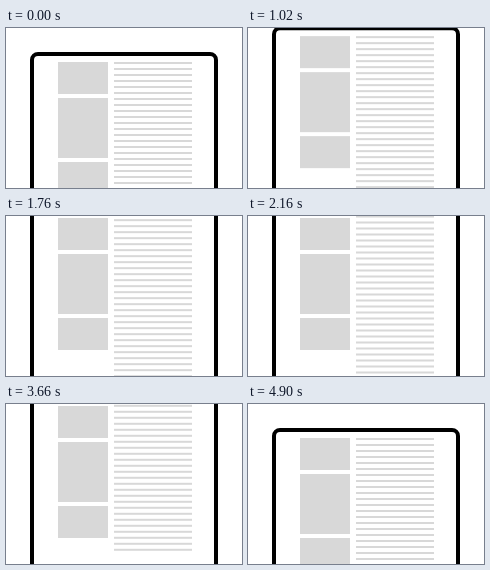
Animation of 236x160 px, one loop 4.92 s. Source, as an HTML page with a canvas:

```html
<!DOCTYPE html>
<html lang="en">
<head>
<meta charset="utf-8">
<title>Sticky sidebar</title>
<style>
  html, body { margin: 0; width: 100%; height: 100%; overflow: hidden; background: #fff; }
  canvas { display: block; }
</style>
</head>
<body>
<canvas id="stage" width="236" height="160"></canvas>
<script>
  const ctx = document.getElementById('stage').getContext('2d');
  const LOOP = 4920, STEP = 20;
  const TOP = 34, STICKY_TOP = 2, DISTANCE = 94;
  const LINES = 33, PITCH = 6;

  // Steady scroll down, a rest, then a cosine-eased return.
  function scrollAt(t) {
    if (t < 360 || t >= 4900) return 0;
    if (t < 2760) return DISTANCE * (t - 360) / 2400;
    if (t < 3660) return DISTANCE;
    return DISTANCE * (1 + Math.cos(Math.PI * (t - 3256) / 1680)) / 2;
  }

  function draw(scroll) {
    ctx.fillStyle = '#fff';
    ctx.fillRect(0, 0, 236, 160);

    ctx.strokeStyle = '#000';
    ctx.lineWidth = 4;
    ctx.beginPath();
    ctx.roundRect(26, 26 - scroll, 184, 400, 6);
    ctx.stroke();

    ctx.fillStyle = '#d8d8d8';
    let y = Math.max(STICKY_TOP, TOP - scroll);
    for (const height of [32, 60, 32]) {
      ctx.fillRect(52, y, 50, height);
      y += height + 4;
    }
    for (let i = 0; i < LINES; i++) {
      ctx.fillRect(108, TOP + i * PITCH - scroll, 78, 2);
    }
  }

  function tick() {
    const t = performance.now() % LOOP;
    draw(scrollAt(Math.floor(t / STEP) * STEP));
    requestAnimationFrame(tick);
  }
  tick();
</script>
</body>
</html>
```
